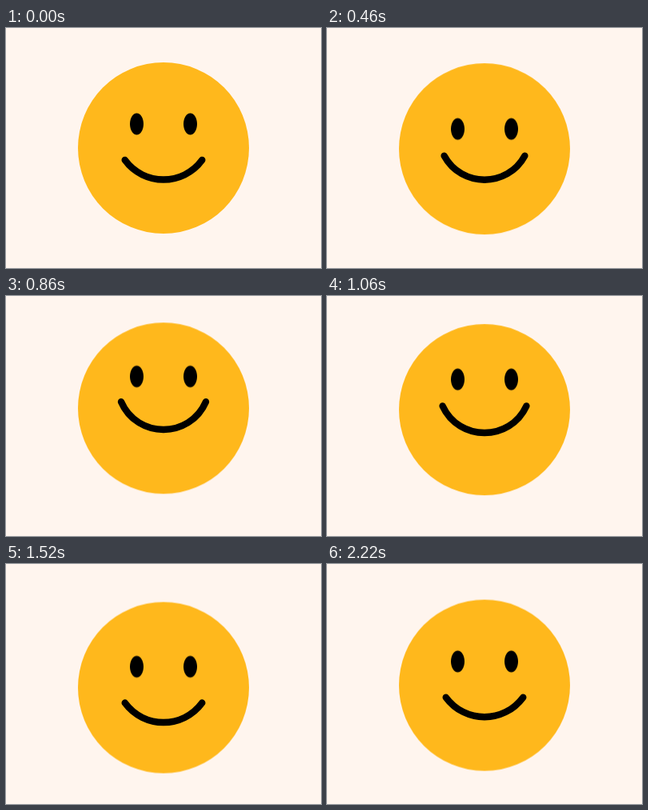
An HTML page without scripts for the animation above (2.54 s loop, 394 by 300 pixels).

```html
<!DOCTYPE html>
<html lang="en">
<head>
<meta charset="utf-8">
<title>Bouncing smiley</title>
<style>
  html, body { margin: 0; width: 100%; height: 100%; overflow: hidden; background: #fff5ee; }
  svg { display: block; width: 100%; height: 100%; }

  .head, .eyes, .eye, .mouth { animation: 2540ms infinite; }
  .head { animation-name: head; fill: #ffb81c; }
  .eyes { animation-name: eyes; }
  .eye { animation-name: blink; }
  .mouth { animation-name: smile; fill: none; stroke: #000; stroke-width: 8.4; stroke-linecap: round; }

  /* All parts share the same beats: dip, jump, land, rebound, settle. */
  @keyframes head {
    0%, .79% { transform: translateY(150px); animation-timing-function: cubic-bezier(.4, 0, .4, 1); }
    9.84% { transform: translateY(167.4px); animation-timing-function: cubic-bezier(.25, 0, .2, 1); }
    33.86% { transform: translateY(140.3px); animation-timing-function: cubic-bezier(.7, 0, .7, 1); }
    55.51% { transform: translateY(155.7px); animation-timing-function: cubic-bezier(.25, 0, .55, 1); }
    75.59% { transform: translateY(149.4px); animation-timing-function: ease-in-out; }
    87.4%, 100% { transform: translateY(151.6px); }
  }
  @keyframes eyes {
    0%, .79% { transform: translateY(120px); animation-timing-function: cubic-bezier(.4, 0, .4, 1); }
    9.84% { transform: translateY(164.7px); animation-timing-function: cubic-bezier(.25, 0, .2, 1); }
    33.86% { transform: translateY(100.6px); animation-timing-function: cubic-bezier(.7, 0, .7, 1); }
    55.51% { transform: translateY(130.6px); animation-timing-function: cubic-bezier(.25, 0, .55, 1); }
    75.59% { transform: translateY(118.4px); animation-timing-function: ease-in-out; }
    87.4%, 100% { transform: translateY(121.8px); }
  }
  @keyframes blink {
    0%, .79%, 18%, 100% {
      d: path("M-8.5 0C-8.5 -7.5 -4.7 -13.5 0 -13.5C4.7 -13.5 8.5 -7.5 8.5 0C8.5 7.5 4.7 13.5 0 13.5C-4.7 13.5 -8.5 7.5 -8.5 0Z");
      animation-timing-function: ease-in-out;
    }
    9.84%, 10.4% {
      d: path("M-11.5 0C-7 -1.1 -3 -1.8 0 -1.8C3 -1.8 7 -1.1 11.5 0C7 1.1 3 1.8 0 1.8C-3 1.8 -7 1.1 -11.5 0Z");
      animation-timing-function: ease-in-out;
    }
  }
  @keyframes smile {
    0%, .79% { d: path("M148.7 165c24 32.7 72.6 32.7 96.6 0"); animation-timing-function: cubic-bezier(.4, 0, .4, 1); }
    9.84% { d: path("M150.5 201.3c23.7 30 69.3 30 93 0"); animation-timing-function: cubic-bezier(.25, 0, .2, 1); }
    33.86% { d: path("M144 132.2c20.2 46.4 85.8 46.4 106 0"); animation-timing-function: cubic-bezier(.7, 0, .7, 1); }
    55.51% { d: path("M148.7 175.8c24 32.7 72.6 32.7 96.6 0"); animation-timing-function: cubic-bezier(.25, 0, .55, 1); }
    75.59% { d: path("M148.7 163.3c24 32.7 72.6 32.7 96.6 0"); animation-timing-function: ease-in-out; }
    87.4%, 100% { d: path("M148.7 166.7c24 32.7 72.6 32.7 96.6 0"); }
  }
</style>
</head>
<body>
<svg viewBox="0 0 394 300">
  <circle class="head" cx="197" r="107"/>
  <g class="eyes">
    <g transform="translate(163.5)"><path class="eye"/></g>
    <g transform="translate(230.5)"><path class="eye"/></g>
  </g>
  <path class="mouth"/>
</svg>
</body>
</html>
```
